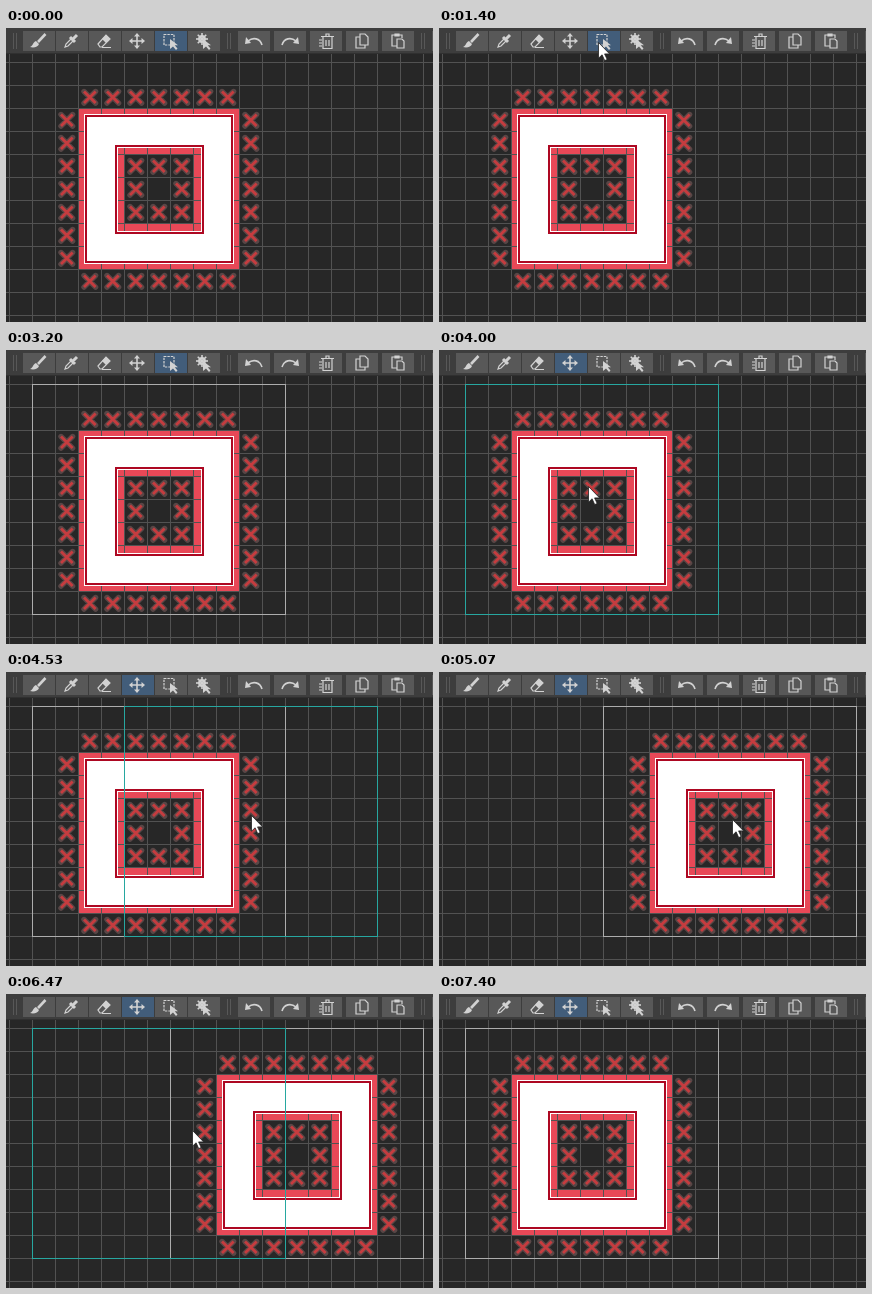
These frames come from a looping animation (427 px wide and 294 px high, 7990 ms). An HTML page:

```html
<!DOCTYPE html>
<html lang="en">
<head>
<meta charset="utf-8">
<title>Moving a tile selection</title>
<style>
html, body { margin: 0; width: 100%; height: 100%; overflow: hidden; background: #272727; }
svg { display: block; width: 427px; height: 294px; }
.crisp { shape-rendering: crispEdges; }
.icon { fill: none; stroke: #d2d2d2; stroke-width: 1.2; }
.solid { fill: #d2d2d2; stroke: none; }
</style>
</head>
<body>
<svg viewBox="0 0 427 294">
  <rect width="427" height="294" fill="#272727"/>
  <g class="piece crisp"><path id="red" fill="#e84857" fill-rule="evenodd"/></g>
  <path id="grid" class="crisp" stroke="#525252" fill="none"/>
  <g class="piece">
    <path id="white" class="crisp" fill="#fff" fill-rule="evenodd"/>
    <path id="rim" class="crisp" fill="#ad0822" fill-rule="evenodd"/>
    <path id="haloes" stroke="#594646" stroke-width="5.4" stroke-linecap="round" fill="none"/>
    <path id="crosses" stroke="#c53c3f" stroke-width="2.8" fill="none"/>
  </g>
  <g class="crisp" fill="none">
    <path id="selection" stroke="#adadad"/>
    <path id="ghost" stroke="#27a7a0"/>
  </g>
  <rect width="427" height="26" fill="#3d3d3d"/>
  <rect y="25" width="427" height="1" fill="#303030"/>
  <g id="buttons" class="crisp"></g>
  <g id="icons" class="icon"></g>
  <path id="cursor" d="M-.5 .5V16.2L3.1 12.8 5.7 18.6 8.2 17.5 5.6 11.9H10.6Z" fill="#fff" stroke="#222" stroke-width=".8"/>
</svg>
<script>
const LOOP = 7990, STEP = 8000 / 120, CELL = 23;
const LEFT = 26, TOP = 34, COLS = 11, ROWS = 10;
const $ = id => document.getElementById(id);
const setPath = (id, d) => $(id).setAttribute('d', d);
const box = (x, y, w, h = w) => `M${x} ${y}h${w}v${h}h${-w}z`;
const repeat = (n, draw) => Array.from({ length: n }, (_, i) => draw(i)).join('');

// Board
setPath('grid',
  repeat(19, i => `M${3.5 + i * CELL} 26V294`) +
  repeat(12, i => `M0 ${TOP + .5 + i * CELL}H427`));

// Hollow block made of nested frames
const BLOCK = { x: 73, y: 81, size: 160 }, HOLE = { x: 119, y: 127, size: 69 };
const inset = (s, by) => box(s.x + by, s.y + by, s.size - 2 * by);
setPath('red', inset(BLOCK, 0) + inset(HOLE, 0));
setPath('white', inset(BLOCK, 5) + inset(HOLE, -7));
setPath('rim', inset(BLOCK, 6) + inset(BLOCK, 8) + inset(HOLE, -10) + inset(HOLE, -8));

// Crosses surround the block outside and line its hole
const cross = (col, row) => `M${78 + col * CELL} ${86.5 + row * CELL}l11.6 11.6m0 -11.6l-11.6 11.6`;
const crosses =
  repeat(7, i => cross(i, -1) + cross(i, 7) + cross(-1, i) + cross(7, i)) +
  repeat(9, i => i === 4 ? '' : cross(2 + i % 3, 2 + Math.floor(i / 3)));
setPath('crosses', crosses);
setPath('haloes', crosses);

// Toolbar
const arrow = '<path class="solid" d="M0 0V10L3 7.5 6 11 7.5 9.5 4.7 6.3H8Z" transform="translate(0 -2)"/>';
const undo = '<path d="M-6 0C-1 -4 6 -3 8 4" stroke-width="1.6"/><path class="solid" d="M-9 3L-8 -4 -3 2Z"/>';
const spokes = repeat(8, i => `<path d="M-1 -2V-8" transform="rotate(${i * 45} -1 -2)" stroke-width="1.6"/>`);
const heads = repeat(4, i => `<path class="solid" d="M0 -8L3 -4.5H-3Z" transform="rotate(${i * 90})"/>`);
const icons = [
  '<path d="M7.5 -7L0 1" stroke-width="2.6"/><path class="solid" d="M-2 0L1 3C0 6 -4 7 -8 6 -5 5 -5 1 -2 0Z"/>',
  '<path d="M1 -3L-5 3 -6 6 -3 5 3 -1"/><path d="M-1 -4L4 1M2 -2L6 -6" stroke-width="3"/>',
  '<path d="M-6 3L2 -6 6 -2 -2 6H-4ZM-2 6.5H7"/><path class="solid" d="M-2 -2L2 -6 6 -2 2 2Z"/>',
  '<path d="M0 -6V6M-6 0H6" stroke-width="1.6"/>' + heads,
  '<path d="M-6 -6.5H4V4H-6Z" stroke-dasharray="2.4 1"/>' + arrow,
  spokes + '<circle cx="-1" cy="-2" r="3" stroke-width="1.8"/>' + arrow,
  undo,
  `<g transform="scale(-1 1)">${undo}</g>`,
  '<path d="M-3 -4V7.5H6V-4M-5 -4.5H8M0 -5V-7H3V-5M0 -1V5M3 -1V5M-7 -1H-4M-7 2H-4M-7 5H-4"/>',
  '<path d="M-2 -7H3L6 -4V4H-2ZM-2 -4H-6V7H3V4"/>',
  '<path d="M-1 5H-6V-6H4V-3M-3 -7H1V-5H-3ZM-1 -2H4L6 0V7H-1Z"/>'
];
const TOOLS = 6, SELECT_TOOL = 4, MOVE_TOOL = 3;
const iconX = i => i < TOOLS ? 32 + 33 * i : 248 + 36 * (i - TOOLS);
const bar = (x, y, w, h, id = '') => `<rect id="${id}" x="${x}" y="${y}" width="${w}" height="${h}" fill="#585858"/>`;
const grip = x => bar(x, 5, 1, 16) + bar(x + 3, 5, 1, 16);
$('buttons').innerHTML = grip(7) + grip(221) + grip(415) + bar(426, 3, 1, 20) +
  repeat(icons.length, i => bar(iconX(i) - (i < TOOLS ? 15 : 16), 3, 32, 20, 'tool' + i));
$('icons').innerHTML = icons.map((art, i) => `<g transform="translate(${iconX(i)} 13)">${art}</g>`).join('');

// Eased pointer moves, timed in ticks. One with `from` makes the pointer reappear there.
const moves = [
  { begin: 4, end: 13, from: [414, 282], to: [177, 11] },
  { begin: 17, end: 18, from: [166, 6], to: [160, 14] },
  { begin: 21, end: 32, to: [27, 36], bend: [30, 225] },
  { begin: 32, end: 41, to: [260, 261] },
  { begin: 43, end: 47, to: [171, 26] },
  { begin: 52, end: 60, from: [134, 12], to: [150, 136] },
  { begin: 60, end: 73, to: [294, 147] },
  { begin: 78, end: 84, to: [336, 141] },
  { begin: 86, end: 97, to: [187, 136] },
  { begin: 102, end: 110, to: [300, 292] }
];
const SELECT_START = 33, SELECT_END = 41, MOVE_START = 52;
const drags = [{ press: 60, drop: 76 }, { press: 86, drop: 102 }];

const smooth = p => p * p * (3 - 2 * p);

function pointerAt(tick) {
  const i = moves.findLastIndex(m => m.begin <= tick);
  if (i < 0) return null;
  const { begin, end, to, bend, from = moves[i - 1].to } = moves[i];
  const next = moves[i + 1];
  if (tick > end && (!next || next.from)) return null;

  const p = smooth(Math.min(1, (tick - begin) / (end - begin)));
  const [x, y] = from.map((a, axis) => {
    const control = bend ? bend[axis] : (a + to[axis]) / 2;
    return Math.round((1 - p) ** 2 * a + 2 * p * (1 - p) * control + p * p * to[axis]);
  });
  return { x, y };
}

const column = x => Math.floor((x - LEFT) / CELL);
const row = y => Math.floor((y - TOP) / CELL);
const outline = (x, cols = COLS, rows = ROWS) => box(x + .5, TOP + .5, cols * CELL, rows * CELL);

function selectionPath(tick, pointer, shift) {
  if (tick < SELECT_START) return '';
  if (tick <= SELECT_END) return outline(LEFT, column(pointer.x) + 1, row(pointer.y) + 1);
  return outline(LEFT + shift);
}

function ghostPath(tick, pointer, shift) {
  const drag = drags.find(d => tick >= d.press && tick < d.drop);
  if (!drag) return '';
  const moved = column(pointer.x) - column(pointerAt(drag.press).x);
  return outline(LEFT + shift + moved * CELL);
}

function render(time) {
  const tick = Math.floor((time % LOOP + 4) / STEP);
  const pointer = pointerAt(tick);
  const shift = tick >= drags[0].drop && tick < drags[1].drop ? 6 * CELL : 0;

  document.querySelectorAll('.piece').forEach(g => g.setAttribute('transform', `translate(${shift} 0)`));
  setPath('selection', selectionPath(tick, pointer, shift));
  setPath('ghost', ghostPath(tick, pointer, shift));

  const active = tick >= MOVE_START ? MOVE_TOOL : SELECT_TOOL;
  for (const i of [SELECT_TOOL, MOVE_TOOL]) {
    $('tool' + i).setAttribute('fill', i === active ? '#425d7a' : '#585858');
  }

  $('cursor').setAttribute('visibility', pointer ? 'visible' : 'hidden');
  if (pointer) $('cursor').setAttribute('transform', `translate(${pointer.x} ${pointer.y})`);
}

const start = performance.now();
function loop() {
  render(performance.now() - start);
  requestAnimationFrame(loop);
}
loop();
</script>
</body>
</html>
```
